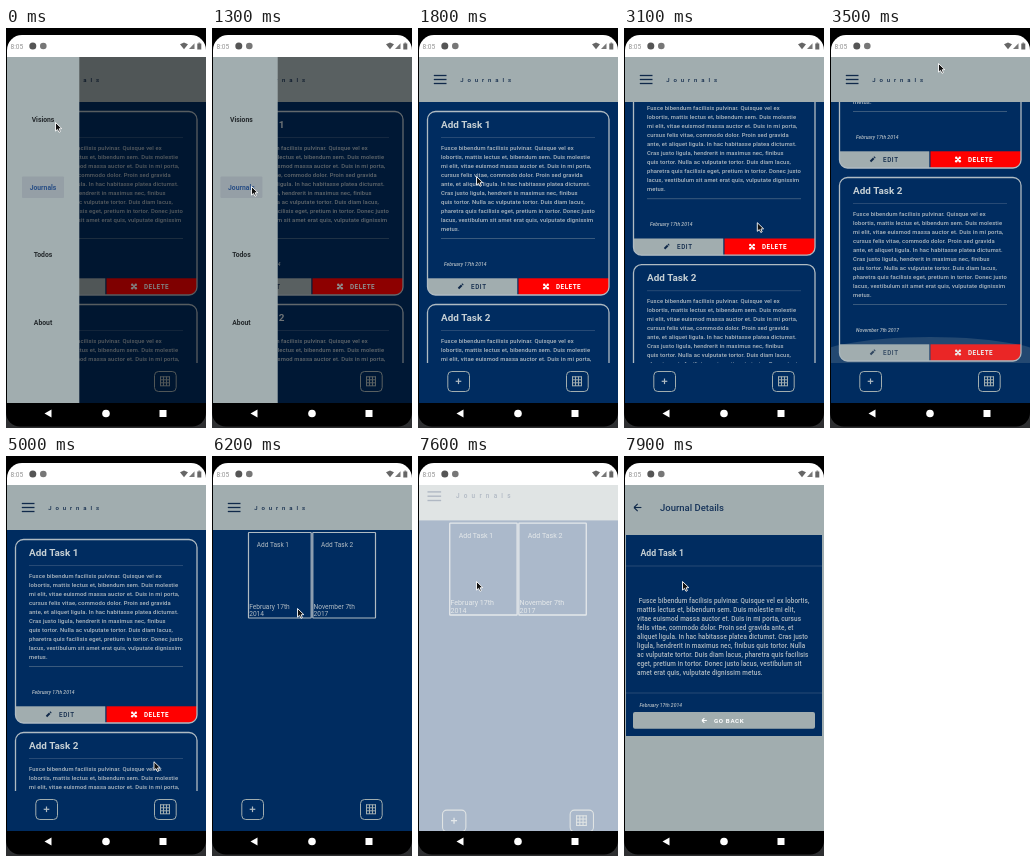
These frames come from a looping animation (200 by 400 pixels, 8000 ms). An HTML page with a canvas:

```html
<!DOCTYPE html>
<html lang="en">
<head>
<meta charset="utf-8">
<title>Journals</title>
<style>
  html, body { margin: 0; width: 100%; height: 100%; overflow: hidden; background: #000; }
  canvas { display: block; width: 200px; height: 400px; }
</style>
</head>
<body>
<canvas id="stage"></canvas>
<script>
const LOOP = 8000, STEP = 100, MAX_SCROLL = 127;
const NAVY = '#002c60', GREY = '#a1adaf', INK = '#10294a', PALE = '#b0bbc2', RULE = '#31527a';
const FONT = 'Roboto, "Open Sans", sans-serif';
const TASKS = [
  { title: 'Add Task 1', date: 'February 17th 2014' },
  { title: 'Add Task 2', date: 'November 7th 2017' }
];

// "/" ends a line on the cards, "|" ends a line on the details page
const BODY = 'Fusce bibendum facilisis pulvinar. Quisque vel ex/ lobortis,| mattis lectus et, bibendum sem. ' +
  'Duis molestie/ mi elit,| vitae euismod massa auctor et. Duis in mi porta,/ cursus| felis vitae, commodo dolor. ' +
  'Proin sed gravida/ ante, et| aliquet ligula. In hac habitasse platea dictumst./ Cras justo| ligula, hendrerit ' +
  'in maximus nec, finibus/ quis tortor. Nulla| ac vulputate tortor. Duis diam lacus,/ pharetra quis facilisis| ' +
  'eget, pretium in tortor. Donec justo/ lacus, vestibulum sit| amet erat quis, vulputate dignissim/ metus.';
const CARD_LINES = BODY.replaceAll('|', '').split('/ ');
const DETAIL_LINES = BODY.replaceAll('/', '').split('| ');

const POINTER_START = { x: 49, y: 94 };
const POINTER_MOVES = [
  { from: 200, to: 1000, x: 39, y: 158 },
  { from: 1500, to: 1800, x: 58, y: 148 },
  { from: 1800, to: 2100, x: 114, y: 92 },
  { from: 2100, to: 2400, x: 154, y: 167 },
  { from: 2700, to: 2800, x: 139, y: 234 },
  { from: 3000, to: 3500, x: 108, y: 35 },
  { from: 3700, to: 4200, x: 114, y: 166 },
  { from: 4300, to: 5200, x: 157, y: 345 },
  { from: 5700, to: 5800, x: 128, y: 256 },
  { from: 5900, to: 6200, x: 85, y: 152 },
  { from: 6200, to: 6500, x: 140, y: 84 },
  { from: 6500, to: 6800, x: 58, y: 125 }
];

const canvas = document.getElementById('stage');
const ctx = canvas.getContext('2d');
const ratio = window.devicePixelRatio || 1;
canvas.width = 200 * ratio;
canvas.height = 400 * ratio;

const clamp = (v, lo, hi) => Math.min(hi, Math.max(lo, v));
const progress = (t, from, to) => clamp((t - from) / (to - from), 0, 1);
const smooth = k => k * k * (3 - 2 * k);
const easeOut = k => 1 - (1 - k) ** 1.6;
const pulse = (t, from, to) => Math.sin(Math.PI * progress(t, from, to));

function pointerAt(t) {
  let { x, y } = POINTER_START;
  for (const move of POINTER_MOVES) {
    const k = progress(t, move.from, move.to);
    x += (move.x - x) * k;
    y += (move.y - y) * k;
  }
  return { x, y };
}

// The list follows the pointer through two drags: up, then back down
function scrollAt(t) {
  if (t < 3000) return 0;
  const grip = t < 3600 ? 234 : 165;
  return clamp(grip - pointerAt(t).y, 0, MAX_SCROLL);
}

function rect(x, y, w, h, fill) {
  ctx.fillStyle = fill;
  ctx.fillRect(x, y, w, h);
}

function box(x, y, w, h, r, fill, stroke, line = 1) {
  ctx.beginPath();
  ctx.roundRect(x, y, w, h, r);
  if (fill) { ctx.fillStyle = fill; ctx.fill(); }
  if (stroke) { ctx.strokeStyle = stroke; ctx.lineWidth = line; ctx.stroke(); }
}

function disc(x, y, r, fill) {
  ctx.beginPath();
  ctx.arc(x, y, r, 0, 7);
  ctx.fillStyle = fill;
  ctx.fill();
}

function poly(points, fill) {
  ctx.beginPath();
  points.forEach(([x, y]) => ctx.lineTo(x, y));
  ctx.closePath();
  ctx.fillStyle = fill;
  ctx.fill();
}

function line(x1, y1, x2, y2, color, width = 1) {
  ctx.beginPath();
  ctx.moveTo(x1, y1);
  ctx.lineTo(x2, y2);
  ctx.strokeStyle = color;
  ctx.lineWidth = width;
  ctx.stroke();
}

// y is the vertical middle of the capitals
function text(str, x, y, size, color, { style = '500', gap = 0, align = 'left' } = {}) {
  ctx.font = `${style} ${size}px ${FONT}`;
  ctx.letterSpacing = gap + 'px';
  ctx.textAlign = align;
  ctx.fillStyle = color;
  ctx.fillText(str, x, y + size * 0.355);
}

function clipped(x, y, w, h, r, draw) {
  ctx.save();
  ctx.beginPath();
  ctx.roundRect(x, y, w, h, r);
  ctx.clip();
  draw();
  ctx.restore();
}

function backArrow(x, y, s, color) {
  line(x, y, x + 2 * s, y, color, 1.1);
  line(x, y, x + s, y - s, color, 1.1);
  line(x, y, x + s, y + s, color, 1.1);
}

function pencil(x, y) {
  line(x + 1, y + 2, x + 4.2, y - 1.2, INK, 2);
  line(x + 4.7, y - 1.7, x + 5.5, y - 2.5, INK, 2);
}

function knot(x, y) {
  for (const dx of [-1.8, 1.8]) {
    for (const dy of [-1.8, 1.8]) {
      disc(x + dx, y + dy, 1.2, '#fff');
      line(x, y, x + dx, y + dy, '#fff', 1.2);
    }
  }
}

function taskCard(task, y) {
  clipped(9.5, y, 181.5, 183.5, 8, () => {
    text(task.title, 23, y + 12.5, 9.9, '#c6d0d4', { style: 'bold' });
    line(23, y + 26, 177, y + 26, RULE, 0.8);
    CARD_LINES.forEach((s, i) => text(s, 23, y + 36.6 + i * 9, 5.85, PALE, { gap: 0.1 }));
    line(23, y + 127, 177, y + 127, '#4a6685', 0.8);
    text(task.date, 26, y + 152.5, 5, PALE, { style: 'italic 500' });
    rect(9, y + 166.8, 90.3, 18, GREY);
    rect(100.5, y + 166.8, 92, 18, '#ff0000');
    pencil(39.5, y + 175);
    text('EDIT', 53, y + 175, 6.3, INK, { gap: 0.6 });
    knot(128, y + 175);
    text('DELETE', 138, y + 175, 6.3, '#fff', { style: 'bold', gap: 0.5 });
  });
  box(9.5, y, 181.5, 183.5, 8, null, PALE, 1.3);
}

function glow(y, strength) {
  ctx.globalAlpha = 0.22 * strength;
  ctx.beginPath();
  ctx.ellipse(100, y, 125, 26, 0, 0, 7);
  ctx.fillStyle = GREY;
  ctx.fill();
  ctx.globalAlpha = 1;
}

function taskList(t) {
  const scroll = scrollAt(t);
  clipped(1, 74, 199, 261, 0, () => {
    TASKS.forEach((task, i) => taskCard(task, 83.5 + i * 193 - scroll));
    glow(335, pulse(t, 3300, 3700));
    glow(74, pulse(t, 4200, 4800));
  });
}

function taskGrid() {
  TASKS.forEach((task, i) => {
    const x = 36.5 + i * 64.3;
    const cut = task.date.lastIndexOf(' ');
    box(x, 76.5, 62.7, 85.5, 0.5, null, PALE, 1.2);
    text(task.title, x + 8.3, 88.5, 6.5, PALE, { style: '400' });
    text(task.date.slice(0, cut), x + 0.7, 150.2, 6.6, PALE, { style: '400' });
    text(task.date.slice(cut + 1), x + 0.7, 157.7, 6.6, PALE, { style: '400' });
  });
}

function footer() {
  box(29.8, 343.5, 21.7, 20, 4, null, GREY);
  line(37.7, 353.3, 43.3, 353.3, PALE, 1.2);
  line(40.5, 350.5, 40.5, 356.1, PALE, 1.2);
  box(148.5, 343.5, 21.7, 20, 4, null, GREY);
  for (let i = 0; i < 4; i++) {
    const d = i * 3;
    line(154.5 + d, 348.5, 154.5 + d, 358, GREY);
    line(154, 348.8 + d, 164, 348.8 + d, GREY);
  }
}

function journals(t) {
  rect(0, 29, 200, 346, NAVY);
  if (t < 5500) taskList(t); else taskGrid();
  rect(0, 29, 200, 45, GREY);
  for (let i = 0; i < 3; i++) line(15.8, 47.5 + i * 4, 28.5, 47.5 + i * 4, INK, 1.3);
  text('Journals', 42.3, 51.5, 6, INK, { gap: 3.9 });
  footer();
}

function details() {
  rect(0, 29, 200, 346, GREY);
  backArrow(10, 51.5, 3.7, INK);
  text('Journal Details', 36, 52, 9.5, '#17345a');
  rect(2, 79, 196, 201, NAVY);
  text('Add Task 1', 16.5, 96.5, 8.7, '#c6d0d4', { style: 'bold' });
  line(2, 110, 198, 110, RULE, 0.8);
  DETAIL_LINES.forEach((s, i) => text(s, i ? 13 : 14.8, 145 + i * 8.95, 6.4, PALE, { gap: 0.1 }));
  line(2, 237, 198, 237, RULE, 0.8);
  text('February 17th 2014', 15.5, 249, 5, PALE, { style: 'italic 500' });
  box(9, 256, 182, 16.7, 2, GREY);
  backArrow(78, 264.5, 2.4, '#fff');
  text('GO BACK', 90, 264.5, 6.2, '#fff', { style: 'bold', gap: 0.6 });
}

function drawer(open) {
  if (open <= 0) return;
  rect(0, 29, 200, 346, `rgba(0,0,0,${0.5 * open})`);
  ctx.save();
  ctx.translate(-73 * (1 - open), 0);
  rect(0, 29, 73.3, 346, GREY);
  box(16, 148.5, 42, 21.5, 1, '#959fa6');
  ['Visions', 'Journals', 'Todos', 'About'].forEach((name, i) =>
    text(name, 37, 91.5 + i * 67.7, 6.8, i === 1 ? '#2a4f86' : '#24292c', { style: 'bold', align: 'center' }));
  ctx.restore();
}

function scaled(k, draw) {
  ctx.save();
  ctx.translate(100, 202);
  ctx.scale(k, k);
  ctx.translate(-100, -202);
  draw();
  ctx.restore();
}

function screen(t) {
  const leave = easeOut(progress(t, 7300, 7900));
  scaled(1 + 0.112 * leave, () => journals(t));
  drawer(1 - smooth(progress(t, 1200, 1700)));
  ctx.globalAlpha = leave;
  if (t < 7700) rect(0, 29, 200, 346, '#fff');
  else scaled(0.85 + 0.15 * leave, details);
  ctx.globalAlpha = 1;
}

function phone() {
  rect(0, 0, 200, 400, '#2e2f31');
  box(0, 0, 200, 398.5, [0, 0, 14, 14], '#000');
  box(1, 7, 199, 40, [15, 15, 0, 0], '#fff');
  text('8:05', 4.5, 18.3, 6.6, '#949494', { style: '400' });
  disc(26.8, 18, 3.5, '#555');
  disc(37.3, 18, 3.3, '#777');
  poly([[174, 16.3], [178, 14.6], [182, 16.3], [178, 21.2]], '#666');
  poly([[183, 21], [188.5, 15.2], [188.5, 21]], '#777');
  rect(191.3, 15.5, 4, 6, '#666');
  rect(192.4, 14.6, 1.8, 1, '#666');
  poly([[38.5, 385.5], [45.5, 381.5], [45.5, 389.5]], '#fff');
  disc(100, 385.5, 3.8, '#fff');
  rect(153.5, 382, 7, 7, '#fff');
}

function pointer({ x, y }) {
  ctx.save();
  ctx.translate(x + 0.5, y + 0.5);
  ctx.lineJoin = 'round';
  poly([[0, 0], [0, 8.6], [2, 6.9], [3.5, 9.8], [4.9, 9.1], [3.6, 6.3], [6.3, 6.1]], '#111');
  ctx.strokeStyle = '#fff';
  ctx.lineWidth = 0.9;
  ctx.stroke();
  ctx.restore();
}

function frame(now) {
  const t = Math.floor((now % LOOP) / STEP) * STEP;
  ctx.setTransform(ratio, 0, 0, ratio, 0, 0);
  phone();
  clipped(1, 29, 199, 346, 0, () => screen(t));
  pointer(pointerAt(t));
}

const start = performance.now();
function tick() {
  frame(performance.now() - start);
  requestAnimationFrame(tick);
}
tick();
</script>
</body>
</html>
```
